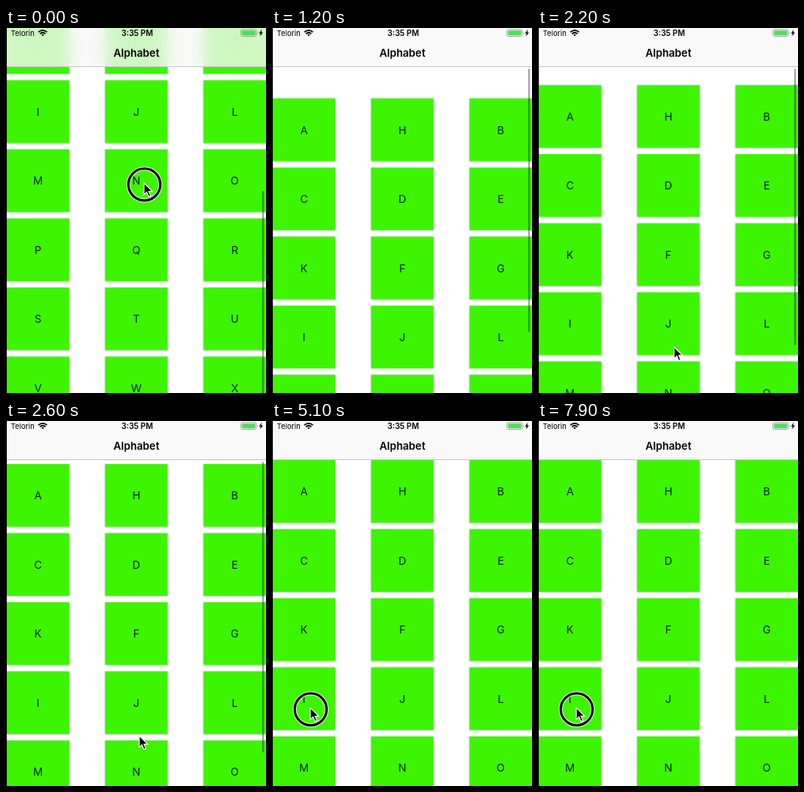
Animation, 326 px wide and 457 px high, one loop 8 s. Source, as an HTML page:

```html
<!DOCTYPE html>
<html lang="en">
<head>
<meta charset="utf-8">
<title>Alphabet</title>
<style>
  html, body { margin: 0; width: 100%; height: 100%; overflow: hidden; background: #fff; }
  svg, #bar { position: absolute; left: 0; top: 0; }
  svg { width: 326px; height: 457px; }
  #bar {
    width: 326px; height: 48px;
    background: rgba(248, 248, 248, .78);
    -webkit-backdrop-filter: blur(11px);
    backdrop-filter: blur(11px);
    border-bottom: 1px solid #c4c4c4;
    box-sizing: content-box;
  }
  text { font-family: Inter, "Liberation Sans", sans-serif; fill: #000; }
  #cells text { font-size: 13.5px; text-anchor: middle; fill: #0a2400; }
  #cells rect { fill: #3df500; }
</style>
</head>
<body>
<svg viewBox="0 0 326 457">
  <defs>
    <filter id="soft" x="-10%" y="-10%" width="120%" height="120%">
      <feDropShadow dx="0" dy="0.5" stdDeviation="1" flood-color="#333" flood-opacity=".4"/>
    </filter>
  </defs>
  <rect width="326" height="457" fill="#fff"/>
  <g id="cells"></g>
</svg>
<div id="bar"></div>
<svg viewBox="0 0 326 457">
  <text x="6" y="9.8" font-size="9.3">Telorin</text>
  <g fill="none" stroke="#000" stroke-width="1.7">
    <path d="M40.6 5.2Q46 .4 51.4 5.2M42.6 7.3Q46 4.2 49.4 7.3"/>
    <path d="M44.3 8.4Q46 7 47.7 8.4L46 10.2Z" fill="#000" stroke="none"/>
  </g>
  <text x="164.5" y="9.8" font-size="9.8" font-weight="600" text-anchor="middle">3:35 PM</text>
  <rect x="294.5" y="1.9" width="19.5" height="8.6" rx="2.2" fill="none" stroke="#8c988c" stroke-width=".8"/>
  <rect x="295.8" y="3.2" width="16.9" height="6" rx="1.1" fill="#55d962"/>
  <path d="M315 4.7q1.3 1.5 0 3z" fill="#8c988c"/>
  <path d="M320.8 1.8L317.2 6.8H319.3L318.4 10.6L322.2 5.4H320Z"/>
  <text x="163.5" y="35.8" font-size="13.2" font-weight="600" text-anchor="middle">Alphabet</text>
  <rect id="thumb" x="321.2" width="2.3" rx="1.15" fill="#000"/>
  <rect width="1" height="457" fill="#000"/>
  <g id="pointer">
    <g id="ring" fill="none">
      <circle cx=".5" cy="2" r="20" stroke="#fff" stroke-opacity=".85" stroke-width="5"/>
      <circle cx=".5" cy="2" r="20" stroke="#000" stroke-width="3"/>
    </g>
    <path d="M0 0V14.6L3.4 11.5L5.9 17.2L8.4 16.1L6 10.6H10.6Z" stroke="#fff" stroke-width="1.2"/>
  </g>
</svg>
<script>
const LOOP = 8000;
const ROWS = ["AHB", "CDE", "KFG", "IJL", "MNO", "PQR", "STU", "VWX"];
const PITCH = 86.5, TOP = 49, SIZE = 78.3;

// [time, value] keys
const scrollKeys = [[0, -243], [800, -19.5], [1400, 50], [1800, 43], [2600, 5], [3400, 0]];
const xKeys = [[0, 173], [1800, 172], [2600, 167], [3400, 65], [4400, 48]];
const yKeys = [[0, 194], [400, 318], [800, 477], [1100, 485], [1800, 407], [2600, 394], [3400, 381], [4400, 359]];

const $ = id => document.getElementById(id);
const clamp = v => Math.max(0, Math.min(1, v));

function slope(keys, i) {
  return (keys[i + 1][1] - keys[i][1]) / (keys[i + 1][0] - keys[i][0]);
}

// Flat at extremes and ends, so the curve never overshoots its keys.
function tangent(keys, i) {
  if (i === 0) return slope(keys, 0);
  if (i === keys.length - 1) return 0;
  const a = slope(keys, i - 1), b = slope(keys, i);
  return a * b > 0 ? 2 * a * b / (a + b) : 0;
}

function curve(keys, t) {
  const last = keys.length - 1;
  if (t >= keys[last][0]) return keys[last][1];
  let i = 0;
  while (t >= keys[i + 1][0]) i++;
  const [t0, v0] = keys[i], [t1, v1] = keys[i + 1];
  const d = t1 - t0, u = (t - t0) / d, w = 1 - u;
  return v0 * (1 + 2 * u) * w * w + v1 * u * u * (3 - 2 * u)
    + d * u * w * (tangent(keys, i) * w - tangent(keys, i + 1) * u);
}

function step(t) {
  const base = t < 4700 ? 0 : 4700;
  return base + Math.floor((t - base) / 200) * 200;
}

function buildCells() {
  let out = "";
  ROWS.forEach((row, r) => [...row].forEach((letter, c) => {
    const x = 1 + c * 123.3, y = TOP + r * PITCH;
    out += `<rect x="${x}" y="${y}" width="${SIZE}" height="${SIZE}" filter="url(#soft)"/>`
      + `<text x="${x + SIZE / 2}" y="${y + 44.3}">${letter}</text>`;
  }));
  $("cells").innerHTML = out;
}

function render(time) {
  const t = step(time % LOOP);
  const y = curve(scrollKeys, t);
  $("cells").setAttribute("transform", `translate(0 ${y})`);

  const thumb = $("thumb");
  thumb.setAttribute("y", 51 - Math.min(0, y) * 0.63);
  thumb.setAttribute("height", 369 - Math.max(0, y));
  thumb.setAttribute("opacity", 0.36 * clamp((4000 - t) / 600));

  $("pointer").setAttribute("transform", `translate(${curve(xKeys, t)} ${curve(yKeys, t)})`);
  $("ring").setAttribute("visibility", t < 600 || t >= 4700 ? "visible" : "hidden");
}

buildCells();
const start = performance.now();
function tick() {
  render(performance.now() - start);
  requestAnimationFrame(tick);
}
tick();
</script>
</body>
</html>
```
